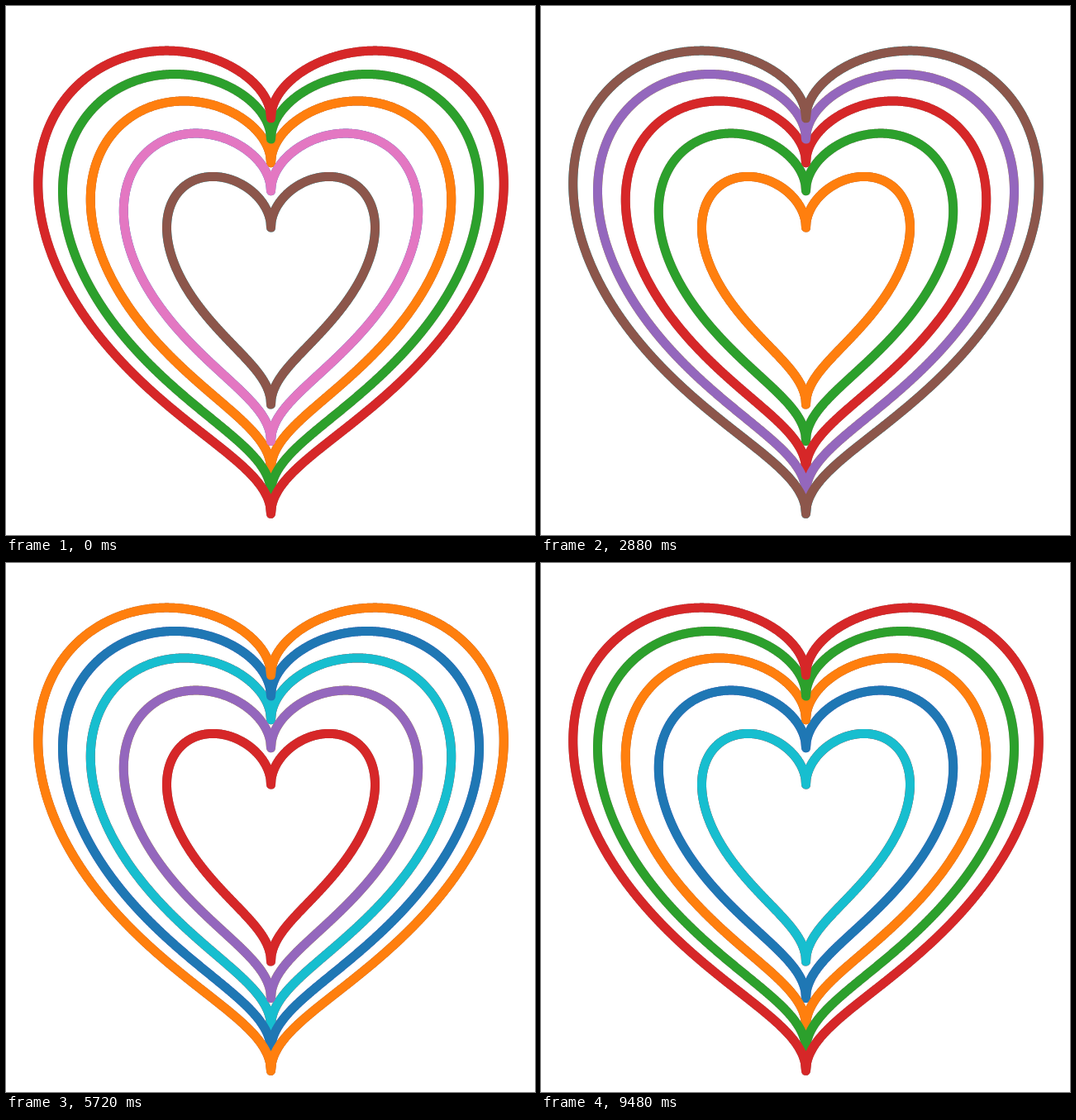
An HTML page with a canvas for the animation above (9960 ms loop, 640 px wide and 640 px high).

```html
<!DOCTYPE html>
<html lang="en">
<head>
<meta charset="utf-8">
<title>Hearts</title>
<style>
  html, body { margin: 0; width: 100%; height: 100%; overflow: hidden; background: #fff; }
  canvas { display: block; width: 100%; height: 100%; }
</style>
</head>
<body>
<canvas id="stage" width="640" height="640"></canvas>
<script>
const ctx = document.getElementById('stage').getContext('2d');
const LOOP = 9960;
const RINGS = 5;
const COLORS = ['#1f77b4', '#ff7f0e', '#2ca02c', '#d62728', '#9467bd',
                '#8c564b', '#e377c2', '#7f7f7f', '#bcbd22', '#17becf'];

// Start of each repaint; rings are repainted from the inside out.
const TIMES = [
  0, 0, 360, 680, 1480,
  1480, 1760, 2120, 2480, 2880,
  3280, 3640, 4000, 4440, 4880,
  5320, 5720, 6160, 6600, 7400,
  7600, 8040, 8480, 8960, 9480
];
const STEPS = TIMES.length;

// x² + (y - √|x|)² = level
function heart(level) {
  const path = new Path2D();
  const r = Math.sqrt(level);
  const n = 1600;
  for (let i = 0; i < n; i++) {
    const a = i / n * 2 * Math.PI;
    const x = r * Math.sin(a);
    const y = r * Math.cos(a) + Math.sqrt(Math.abs(x));
    path.lineTo(320.5 + 126 * x, 375.1 - 107 * y);
  }
  path.closePath();
  return path;
}

const hearts = Array.from({ length: RINGS }, (_, i) => heart(i + 1));

// The colour cycle advances one extra place after every round.
function paint(step) {
  const i = (step + STEPS) % STEPS;
  ctx.strokeStyle = COLORS[(5 + i + Math.floor(i / RINGS)) % COLORS.length];
  ctx.stroke(hearts[i % RINGS]);
}

function draw(last) {
  ctx.fillStyle = '#fff';
  ctx.fillRect(0, 0, 640, 640);
  ctx.lineWidth = 11;
  ctx.lineJoin = 'round';
  // Newer strokes lie on top of older ones.
  for (let s = last - 2 * RINGS + 1; s <= last; s++) paint(s);
}

let shown = -1;
const start = performance.now();

function tick() {
  const t = (performance.now() - start) % LOOP;
  const last = TIMES.filter(time => time <= t).length - 1;
  if (last !== shown) draw(shown = last);
  requestAnimationFrame(tick);
}
tick();
</script>
</body>
</html>
```
